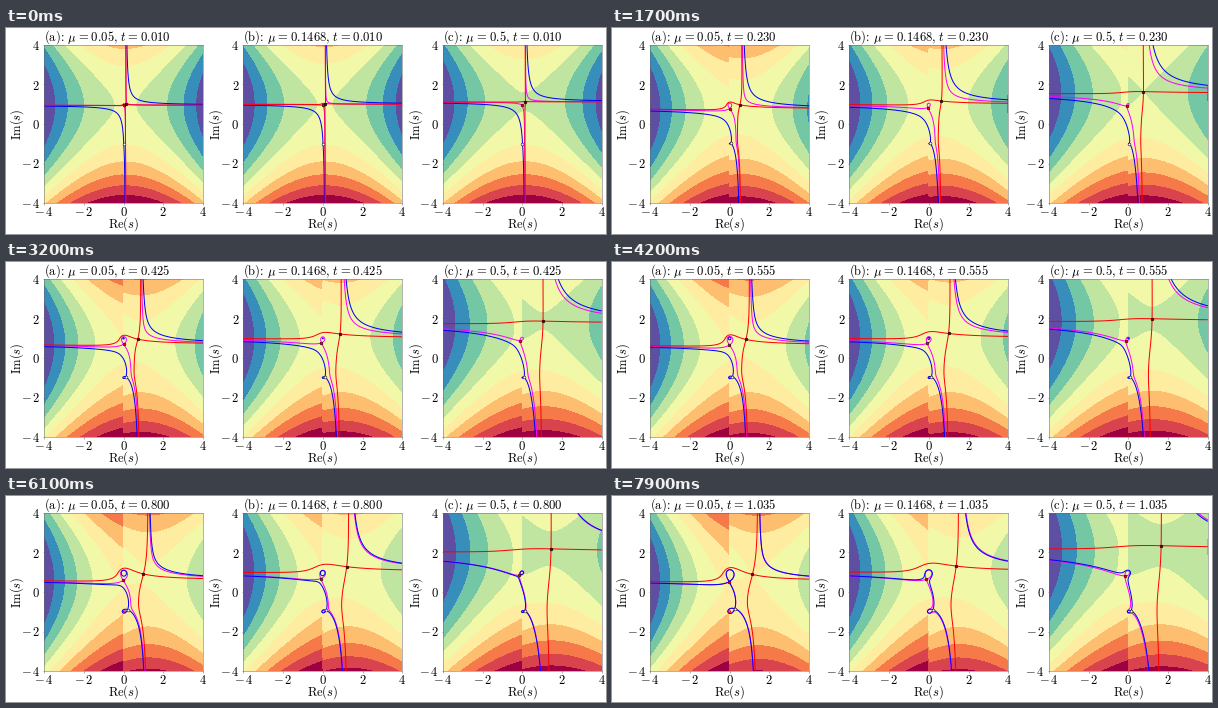
Recreate the animation shown at these times as a matplotlib script. Size 600 px wide and 206 px high, loop 8 s.

```python
import numpy as np
import matplotlib.pyplot as plt
from matplotlib.animation import FuncAnimation

W, H = 600, 206
FRAMES, INTERVAL = 80, 100
PX = 0.72  # points per pixel at 100 dpi
T0, DT = 0.01, 0.005
K_SEED = 83

plt.rcParams["mathtext.fontset"] = "cm"
plt.rcParams["font.family"] = "DejaVu Serif"

# label, viscosity, panel left edge, rough main saddle at the seed time
PANELS = [
    ("a", "0.05", 38.0, 0.72 + 0.96j),
    ("b", "0.1468", 237.3, 0.86 + 1.20j),
    ("c", "0.5", 436.8, 1.02 + 1.87j),
]
LEFT_W, TOP, BOTTOM = 159, 17, 175
FRAME_GREY = "0.4"
EQ = r"\hspace{0.08}=\hspace{0.08}"

nodes, weights = np.polynomial.legendre.leggauss(80)
axis = np.linspace(-4, 4, 240)
X, Y = np.meshgrid(axis, axis)
S = X + 1j * Y
ATAN = np.arctan(S)
BANDS = [plt.get_cmap("Spectral")(v) for v in np.linspace(0, 1, 10)]


def step_time(k):
    return T0 + DT * k


def phase(s, z, t):
    return (s - z) ** 2 / 2 + t * np.arctan(s)


def saddles(z, t):
    """Main saddle, the one near i, the one near -i."""
    r = sorted(np.roots([1, -z, 1, t - z]), key=lambda s: s.imag)
    near, main = sorted(r[1:], key=lambda s: s.real)
    return main, near, r[0]


def newton_step(z, t, mu):
    """Newton correction for a zero of the Cole-Hopf integral."""
    s1, s2, _ = saddles(z, t)
    reach = 10 * np.sqrt(2 * mu * t)
    below = 1j + 0.7 * abs(s2 - 1j) * np.exp(-0.25j * np.pi)
    path = [s2 - reach, s2, below, s1, s1 + reach]
    ref = phase(s1, z, t)
    f = df = 0
    for a, b in zip(path, path[1:]):
        s = (a + b) / 2 + (b - a) / 2 * nodes
        e = np.exp((ref - phase(s, z, t)) / (2 * mu * t)) * weights * (b - a) / 2
        f += e.sum()
        df += (e * (s - z)).sum() / (2 * mu * t)
    return -f / df


def solve_pole(z, t, mu):
    limit = 0.3 * np.sqrt(t)
    for _ in range(25):
        d = newton_step(z, t, mu)
        if abs(d) > limit:
            d *= limit / abs(d)
        z += d
        if abs(d) < 1e-9:
            break
    return z


def pole_path(mu, s, last):
    """Follow the pole in time, both ways from the seed time."""
    t = step_time(K_SEED)
    seed = solve_pole(s + t / (1 + s * s), t, mu)
    path = {K_SEED: seed}
    for ks in (range(K_SEED - 1, -1, -1), range(K_SEED + 1, last + 1)):
        z, t_old = seed, step_time(K_SEED)
        for k in ks:
            t = step_time(k)
            guess = 1j + (z - 1j) * np.sqrt(t / t_old)
            z, t_old = solve_pole(guess, t, mu), t
            path[k] = z
    return path


def frame_step(i):
    return i * 13 // 5


def tick_text(v):
    return rf"$-\,{-v}$" if v < 0 else f"${v}$"


class Panel:
    def __init__(self, fig, name, mu, left, s):
        self.name, self.mu = name, mu
        self.path = pole_path(float(mu), s, frame_step(FRAMES - 1))
        self.drawn = []
        ax = self.ax = fig.add_axes(
            [left / W, 1 - BOTTOM / H, LEFT_W / W, (BOTTOM - TOP) / H])
        ax.set(xlim=(-4, 4), ylim=(-4, 4))
        ticks = [-4, -2, 0, 2, 4]
        labels = [tick_text(v) for v in ticks]
        ax.set_xticks(ticks, labels)
        ax.set_yticks(ticks, labels)
        ax.tick_params(length=1.5 * PX, width=0.5 * PX, color=FRAME_GREY,
                       pad=2.5 * PX, labelsize=12.6 * PX)
        ax.tick_params(axis="x", pad=1.5 * PX)
        for spine in ax.spines.values():
            spine.set(linewidth=0.5 * PX, color=FRAME_GREY)
        size = 12.6 * PX
        mid = (TOP + BOTTOM) / 2
        fig.text((left + LEFT_W / 2) / W, 1 - 199.5 / H, r"$\mathrm{Re}(s)$",
                 size=size, ha="center", va="baseline")
        fig.text((left - 27) / W, 1 - mid / H, r"$\mathrm{Im}(s)$",
                 size=size, ha="center", va="center", rotation=90)
        self.title = fig.text(left / W, 1 - 13 / H, "", size=size,
                              ha="left", va="baseline")

    def draw(self, k):
        for item in self.drawn:
            item.remove()
        ax, t, z = self.ax, step_time(k), self.path[k]
        g = (S - z) ** 2 / 2 + t * ATAN
        edges = np.linspace(g.real.min(), g.real.max(), 11)
        self.drawn = [ax.contourf(X, Y, g.real, edges, colors=BANDS, zorder=0)]

        main, near, low = saddles(z, t)
        for z_order, (s, color) in enumerate(
                [(near, "magenta"), (low, "blue"), (main, "red")], 1):
            self.drawn.append(ax.contour(
                X, Y, g.imag, [phase(s, z, t).imag], colors=color,
                linewidths=PX, linestyles="solid", zorder=z_order))
        for s, face in ((low, "white"), (near, "red"), (main, "#700010")):
            self.drawn += ax.plot(s.real, s.imag, "o", ms=2.8 * PX, mfc=face,
                                  mec="black", mew=0.5 * PX, zorder=5)
        self.title.set_text(
            rf"$\mathrm{{({self.name})}}\hspace{{-0.2}}:\hspace{{0.15}}"
            rf"\mu{EQ}{self.mu},\hspace{{0.1}}t{EQ}{t:.3f}$")


fig = plt.figure(figsize=(W / 100, H / 100), dpi=100, facecolor="white")
panels = [Panel(fig, *p) for p in PANELS]


def update(i):
    for p in panels:
        p.draw(frame_step(i))
    return []


anim = FuncAnimation(fig, update, frames=FRAMES, interval=INTERVAL,
                     init_func=lambda: [], repeat=True, repeat_delay=0,
                     blit=False)
plt.show()
```
